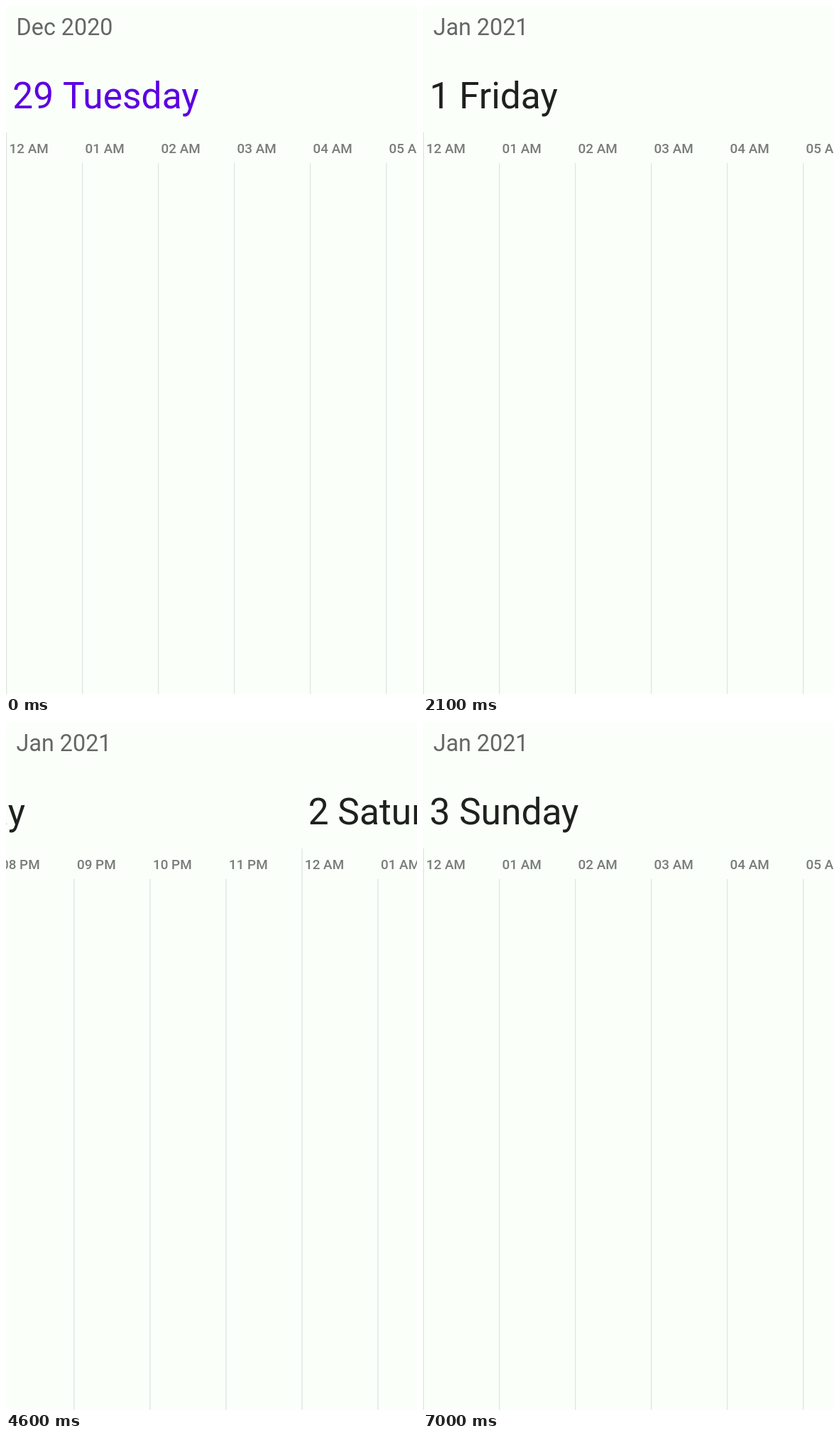
These frames come from a looping animation (579x968 px, 8500 ms). An HTML page with a canvas:

```html
<!DOCTYPE html>
<html lang="en">
<head>
<meta charset="utf-8">
<title>Timeline calendar</title>
<style>
  html, body { margin: 0; width: 100%; height: 100%; overflow: hidden; background: #fafffa; }
  canvas { display: block; width: 100vw; height: 100vh; }
</style>
</head>
<body>
<canvas id="stage" width="579" height="968"></canvas>
<script>
const W = 579, H = 968, LOOP = 8500, TICK = 100;
const HOUR = 107, DAY = 24 * HOUR, MAX_SCROLL = DAY - W;
const FONT = 'Roboto, "Noto Sans", sans-serif';
const ctx = document.getElementById('stage').getContext('2d');

const days = [
  { title: '29 Tuesday', month: 'Dec 2020', color: '#5c00e2',
    events: [[12, 'Plan', 'Execution'], [15, 'Yoga', 'Therapy']] },
  { title: '1 Friday', month: 'Jan 2021', color: '#1e211e',
    events: [[10, 'Yoga', 'Therapy'], [13, 'Consulting']] },
  { title: '2 Saturday', month: 'Jan 2021', color: '#1e211e', events: [] },
  { title: '3 Sunday', month: 'Jan 2021', color: '#1e211e', events: [] }
];

// [time, day index, scroll within that day]
const keys = [
  [0, 0, 0], [900, 0, 1362], [1700, 0, 1975], [1800, 0, MAX_SCROLL],
  [2100, 1, 0], [3500, 1, 0], [4100, 1, 1004.5], [4500, 1, 1950],
  [4900, 2, 0], [5300, 2, 0], [5400, 2, 188], [6000, 2, 1586],
  [6400, 2, MAX_SCROLL], [6600, 2, MAX_SCROLL], [7000, 3, 0], [LOOP, 3, 0]
].map(([t, day, x]) => ({ t, x: day * DAY + x }));

const slope = i => (keys[i + 1].x - keys[i].x) / (keys[i + 1].t - keys[i].t);

function tangent(i) {
  if (i === 0 || i === keys.length - 1) return 0;
  const a = slope(i - 1), b = slope(i);
  return a * b > 0 ? 2 * a * b / (a + b) : 0;
}

// Monotone cubic through the keys
function scrollAt(t) {
  let i = 0;
  while (i < keys.length - 2 && t >= keys[i + 1].t) i++;
  const a = keys[i], b = keys[i + 1], d = b.t - a.t, u = (t - a.t) / d;
  const u2 = u * u, u3 = u2 * u;
  return a.x + (b.x - a.x) * (3 * u2 - 2 * u3)
    + d * (tangent(i) * (u3 - 2 * u2 + u) + tangent(i + 1) * (u3 - u2));
}

function text(str, x, y, size, color, weight = 400) {
  ctx.font = `${weight} ${size}px ${FONT}`;
  ctx.fillStyle = color;
  ctx.fillText(str, x, y);
}

function hourLabel(h) {
  const n = String(h % 12 || 12).padStart(2, '0');
  return `${n} ${h < 12 ? 'AM' : 'PM'}`;
}

function drawEvent([hour, ...lines], left) {
  const x = left + hour * HOUR + 2.5;
  ctx.fillStyle = '#849e7f';
  ctx.beginPath();
  ctx.roundRect(x, 223.5, 101, 156, 3.5);
  ctx.fill();
  lines.forEach((s, i) => text(s, x + 5.3, 245 + i * 22, 19.3, '#fff'));
}

function drawDay(day, left) {
  for (let h = 0; h < 24; h++) {
    const x = left + h * HOUR;
    if (x < -HOUR || x > W) continue;
    const top = h ? 221 : 178;
    ctx.fillStyle = '#e1e5e1';
    ctx.fillRect(x, top, 1.3, H - top);
    text(hourLabel(h), x + 4.6, 207, 18.9, '#797c78', 500);
  }
  day.events.forEach(e => drawEvent(e, left));
}

function render(t) {
  const scroll = scrollAt(t);
  const page = Math.min(days.length - 1, Math.floor(scroll / DAY + 1e-6));
  const pos = scroll - page * DAY;
  const slide = Math.max(0, pos - MAX_SCROLL);

  ctx.fillStyle = '#fafffa';
  ctx.fillRect(0, 0, W, H);
  text(days[page].month, 14.6, 40.7, 32.3, '#646763');

  for (let i = 0; i < 2; i++) {
    const day = days[page + i];
    if (!day) break;
    text(day.title, 9.3 - slide + i * W, 144, 51.5, day.color);
    drawDay(day, i * DAY - pos);
  }
}

const start = performance.now();
function frame() {
  const t = (performance.now() - start) % LOOP;
  render(Math.floor(t / TICK) * TICK);
  requestAnimationFrame(frame);
}
frame();
</script>
</body>
</html>
```
